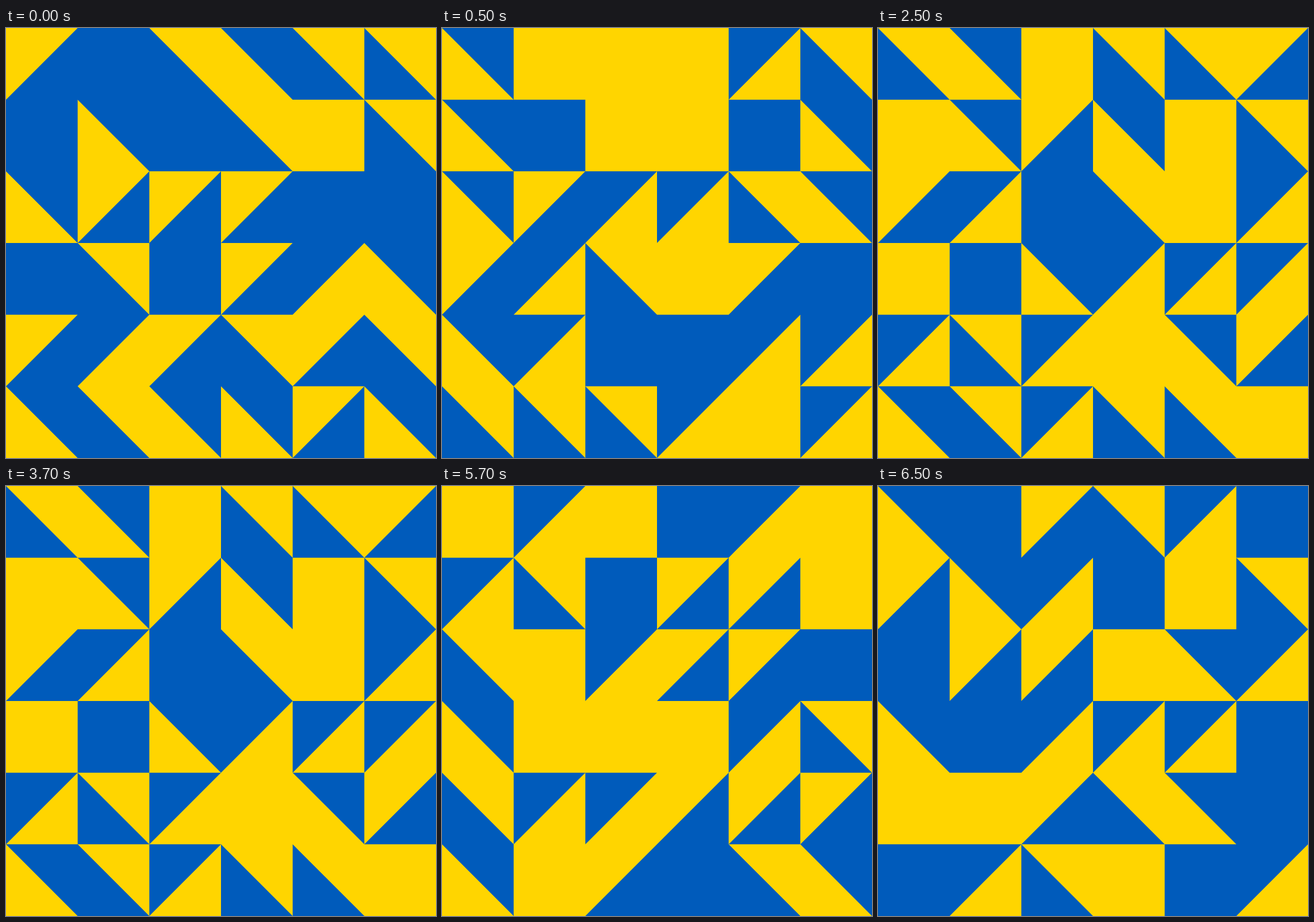
Write an HTML page that moves like this. It is 748 by 748 pixels and loops after 8000 ms.

```html
<!DOCTYPE html>
<html lang="en">
<head>
<meta charset="utf-8">
<title>Triangle tiles</title>
<style>
  html, body { margin: 0; width: 100%; height: 100%; overflow: hidden; background: #005bbb; }
  svg { display: block; width: 100%; height: 100%; }
</style>
</head>
<body>
<svg viewBox="0 0 6 6"><path id="tiles" fill="#ffd500"/></svg>
<script>
// 0: blue tile, 5: yellow tile, 1-4: yellow half at top left, top right, bottom right, bottom left
const patterns = [
  '102422 040252 411100 020134 131212 424414',
  '455532 405504 413324 132510 430033 222353',
  '245221 541452 130253 504333 323541 423225',
  '535035 320115 253110 455532 233111 451024',
  '401230 143052 011543 403330 551240 032503'
];
const corners = [[0, 0], [1, 0], [1, 1], [0, 1]];
const LOOP = 8000, HOLD = 2000, FIRST = 500;

function tile(kind, x, y) {
  if (kind === 0) return '';
  const points = corners.filter((_, i) => kind === 5 || i !== (kind + 1) % 4);
  return 'M' + points.map(([dx, dy]) => `${x + dx} ${y + dy}`).join('L') + 'Z';
}

const paths = patterns.map(pattern =>
  pattern.split(' ').map((row, y) =>
    [...row].map((kind, x) => tile(+kind, x, y)).join('')
  ).join('')
);

const tiles = document.getElementById('tiles');
const start = performance.now();
let shown = -1;

function draw() {
  const t = (performance.now() - start) % LOOP;
  const index = Math.floor((t + HOLD - FIRST) / HOLD);
  if (index !== shown) tiles.setAttribute('d', paths[shown = index]);
  requestAnimationFrame(draw);
}
draw();
</script>
</body>
</html>
```
